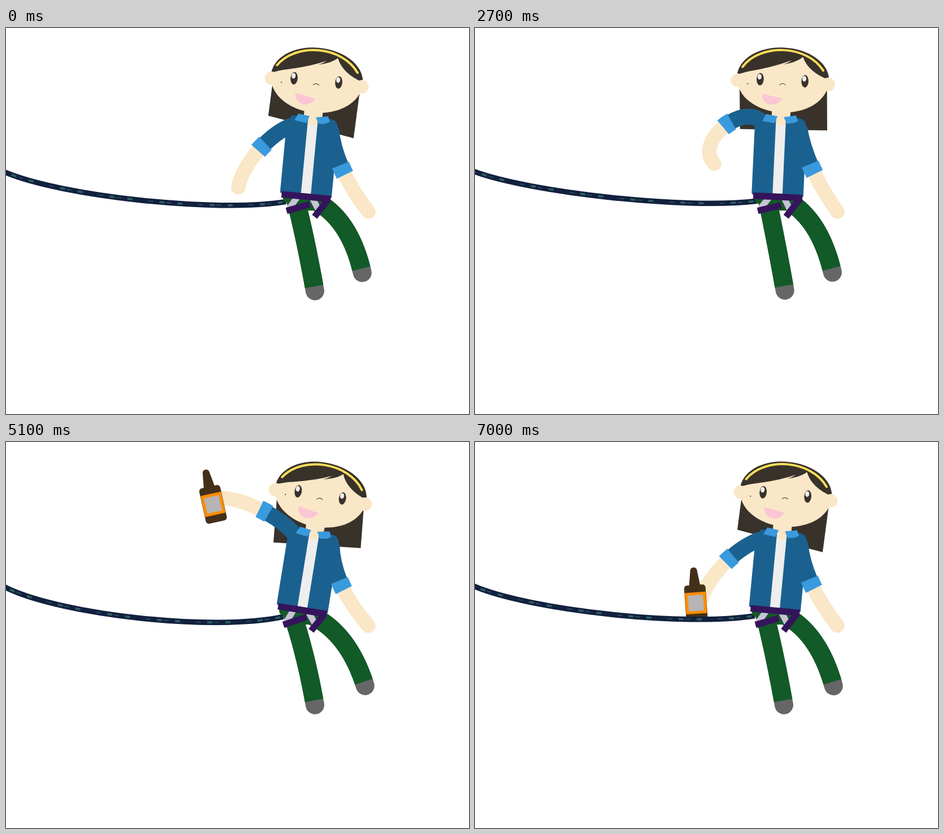
An HTML page for the animation above (7.1 s loop, 819 by 683 pixels).

```html
<!DOCTYPE html>
<html lang="en">
<head>
<meta charset="utf-8">
<title>Swinging on a rope</title>
<style>
html, body { margin: 0; width: 100%; height: 100%; overflow: hidden; background: #fff; }
svg { display: block; width: 100%; height: 100%; }
.line { fill: none; }
.skin { fill: #fae7c7; }
.hair { fill: #38322a; }
.blue { fill: #1b618f; }
.cuff { fill: #3a9ade; }
.arm-skin { stroke: #fae7c7; stroke-width: 25.5; stroke-linecap: round; stroke-dasharray: 60 200; stroke-dashoffset: -50; }
.sleeve { stroke: #1b618f; stroke-width: 28; stroke-dasharray: 44 200; }
.band { stroke: #3a9ade; stroke-width: 32; stroke-dasharray: 11.6 200; stroke-dashoffset: -41; }
.foot { stroke: #666; stroke-width: 33; stroke-linecap: round; }
.leg { stroke: #125a27; stroke-width: 33; stroke-dasharray: 95.3 200; }
.rope { stroke: #12203f; stroke-width: 9.5; }
.fleck, .thread { stroke-dasharray: 9 23 9 47.8; }
.fleck { stroke: #2c625e; stroke-width: 3.6; stroke-dashoffset: -5.5; }
.thread { stroke: #24505a; stroke-width: 1.8; stroke-dashoffset: -25.5; }
.loop { stroke: #35145c; stroke-width: 11.5; }
.strap { stroke: #c9c3d6; stroke-width: 11; }
</style>
</head>
<body>
<svg viewBox="0 0 819 683" preserveAspectRatio="none">
  <g class="sway"><path id="backHair" class="hair"/></g>

  <g class="line" id="leftArm">
    <path class="arm-skin" pathLength="100"/>
    <path class="sleeve" pathLength="100"/>
    <path class="band" pathLength="100"/>
  </g>

  <g id="bottle">
    <g transform="translate(-12 9)">
      <path d="M-10-30L-6-58Q-5-63 0-63T6-58L10-30Z" fill="#44301a"/>
      <rect x="-19" y="-32" width="38" height="64" rx="5.5" fill="#44301a"/>
      <rect x="-18.5" y="-19" width="37" height="38" rx="1" fill="#ff8c00"/>
      <rect x="-13.5" y="-14" width="27" height="28" rx="1" fill="#b6b4b4"/>
    </g>
  </g>

  <g class="line" id="rope">
    <path class="rope"/>
    <path class="fleck"/>
    <path class="thread"/>
  </g>

  <g class="line" id="rightLeg">
    <path class="foot" pathLength="100"/>
    <path class="leg" pathLength="100"/>
  </g>
  <g class="line" id="leftLeg">
    <path class="foot" pathLength="100"/>
    <path class="leg" pathLength="100"/>
  </g>
  <path id="hips" fill="#125a27"/>
  <path id="straps" class="line strap"/>
  <path id="loops" class="line loop"/>

  <g class="sway">
    <path class="blue" d="M-38-40H28Q45-40 45.500-22V99H-43Q-46 99-46 95V-22Z"/>
    <rect x="-9" y="-30" width="17.500" height="127" fill="#eee"/>
    <rect class="skin" x="-17" y="-58" width="33" height="18"/>
    <rect class="skin" x="-9" y="-45" width="17.500" height="19" rx="5"/>
    <path class="cuff" d="M-27-44.500L-6.500-41.500-11.500-29-33-32Z"/>
    <path class="cuff" d="M4.500-40.500L26-44.500 30-35 23-31 10.500-29Z"/>
    <rect x="-43" y="95" width="87" height="11.500" fill="#35145c"/>

    <ellipse class="skin" cy="-106" rx="81" ry="57.500"/>
    <path class="hair" d="M-81.500-111C-79-140-46-163.500-1-163.500S80-140 81.500-110
      Q44-122 33.500-148.500Q23-138.500-1-133.500Q7-136 14-142Q-12-130-51-121Q-71-117-81.500-111Z"/>
    <path class="line" d="M-72.500-126C-42-170 40-170 70.500-126" stroke="#fbdd5a" stroke-width="4" stroke-linecap="round"/>
    <circle class="skin" cx="-80.300" cy="-102" r="12"/>
    <circle class="skin" cx="80.300" cy="-102" r="12"/>
    <g id="eye">
      <ellipse class="hair" cx="-40.300" cy="-105.700" rx="6.300" ry="11"/>
      <ellipse cx="-41.600" cy="-110" rx="3.600" ry="5" fill="#eee"/>
    </g>
    <use href="#eye" x="79.300"/>
    <circle class="hair" cx="-62" cy="-96.600" r="1"/>
    <path class="line" d="M-6-97Q-.5-102.500 5-97.500" stroke="#38322a"/>
    <path d="M-35.500-80L.5-73.500C-5-57-36-56-35.500-80Z" fill="#fbc6d4"/>
  </g>

  <g class="line" id="rightArm">
    <path class="arm-skin" pathLength="100"/>
    <path class="sleeve" pathLength="100"/>
    <path class="band" pathLength="100"/>
  </g>
</svg>
<script>
const LOOP = 7100, STEP = 100, PIVOT = [539.8, 198];
const GRAB = 3250, LIFT = 3700, RAISED = 5100, LOWERED = 6300;
const $ = id => document.getElementById(id);

// Time and place of the moving hand
const hand = [
  [0, 411, 282], [1900, 401, 253], [2700, 423, 240], [GRAB, 512, 258], [LIFT, 466, 256],
  [4400, 372, 192], [RAISED, 376, 99], [5575, 408, 56], [LOWERED, 359, 151], [LOOP, 404, 279]
];

const smooth = u => (1 - Math.cos(Math.PI * Math.min(1, Math.max(0, u)))) / 2;
const between = (t, from, to) => smooth((t - from) / (to - from));
const bump = (t, mid, half) => smooth(1 - Math.abs(t - mid) / half);

// Smooth curve through timed points
function spline(keys, t) {
  let i = 0;
  while (i < keys.length - 2 && t >= keys[i + 1][0]) i++;
  const a = keys[i], b = keys[i + 1];
  const span = b[0] - a[0], u = (t - a[0]) / span;
  const slope = (k, c) => {
    const p = keys[k - 1], n = keys[k + 1];
    return p && n ? (n[c] - p[c]) / (n[0] - p[0]) * span : 0;
  };
  return [1, 2].map(c => {
    const v = a[c], w = b[c], m = slope(i, c), n = slope(i + 1, c);
    return v + u * (m + u * (3 * (w - v) - 2 * m - n + u * (2 * (v - w) + m + n)));
  });
}

// The nearer the hand comes to the shoulder, the more the elbow bows out
function armPath([sx, sy], [hx, hy]) {
  const d = Math.hypot(hx - sx, hy - sy), ux = (hx - sx) / d, uy = (hy - sy) / d;
  const fold = 153 - d, along = 38 - fold * 1.05, out = 22 + fold * 0.8;
  const c1 = [sx + ux * along - uy * out, sy + uy * along + ux * out];
  const c2 = [hx - ux * along - uy * out, hy - uy * along + ux * out];
  return `M${sx} ${sy}C${c1} ${c2} ${hx} ${hy}`;
}

const setPath = (group, d) => {
  for (const p of $(group).children) p.setAttribute('d', d);
};

function draw(t) {
  // Two swings per loop; the one in the middle goes further
  const back = (1 + Math.cos(4 * Math.PI * t / LOOP)) / 2;
  const far = Math.abs(t - LOOP / 2) < LOOP / 4;
  const a = 9.7 - (far ? 13.2 : 4.3) * back;
  const rad = a * Math.PI / 180, cos = Math.cos(rad), sin = Math.sin(rad);
  const at = (x, y) => [PIVOT[0] + x * cos - y * sin, PIVOT[1] + x * sin + y * cos];

  for (const g of document.querySelectorAll('.sway'))
    g.setAttribute('transform', `translate(${PIVOT}) rotate(${a})`);

  const h = (far ? 7.5 : 15.2) * back - 5.8, hx = 4 - 0.7 * h, hy = -19 - 0.4 * h;
  const drop = 77 * Math.tan(h * Math.PI / 180);
  $('backHair').setAttribute('d',
    `M-77-105H78L${hx + 77} ${hy + drop}L${hx - 77} ${hy - drop}Z`);

  const grip = spline(hand, t);
  const turn = -180 + 167.5 * between(t, LIFT, RAISED) + 8.5 * between(t, RAISED, LOWERED);
  setPath('leftArm', armPath(at(-29.5, -25), grip));
  $('bottle').setAttribute('transform', `translate(${grip}) rotate(${turn})`);
  $('bottle').style.display = t < GRAB ? 'none' : '';
  setPath('rightArm', `M${at(33, -23)}Q${588.5 - 1.15 * a} ${244 + 0.95 * a} 641 325`);

  // Drawn from the harness outward so the flecks stay fixed to that end
  setPath('rope', `M${501.5 - 1.2 * a} ${305 + 0.45 * a}C370 ${315.5 + 2.2 * a} ` +
    `100 ${284.5 + 2.4 * a} 0 ${253.2 + 0.5 * a}L-20 ${244 + 0.2 * a}`);

  // The left leg kicks twice, then rests
  const kick = t < 4800 ? 7.5 * Math.sin(Math.PI * t / 2400) ** 2 : 0;
  const lx = 546.5 + kick * 1.5, ly = 465.3 - kick;
  setPath('leftLeg', `M${at(-18, 106)}Q${lx - 16.5} ${ly - 93} ${lx} ${ly}`);
  const stretch = 11.5 * (bump(t, 1500, 1800) + bump(t, 6000, 1800));
  const rx = 629.5 + stretch, ry = 433.3 - 0.33 * stretch;
  setPath('rightLeg', `M${at(20, 108)}Q${612 - 0.6 * a} 340 ${rx} ${ry}`);

  const ox = 504 - 1.45 * a, iy = 315.5 - 0.65 * a;
  const knot = [554.5 - 1.6 * a, 334];
  $('hips').setAttribute('d',
    `M${at(-42, 102)}L${at(-38, 113)}L${ox + 20} 320L${ox + 28} 323H${ox + 54}L${at(42, 104)}Z`);
  $('straps').setAttribute('d',
    `M${at(-15, 103)}L${ox + 5} 319M${at(13, 104)}L${knot[0] + 7} 322`);
  $('loops').setAttribute('d',
    `M${ox} 323.5L${ox + 41} ${iy}M${at(40, 102)}L${knot}`);
}

const start = performance.now();
function tick() {
  const t = (performance.now() - start) % LOOP;
  draw(Math.floor(t / STEP) * STEP);
  requestAnimationFrame(tick);
}
draw(0);
requestAnimationFrame(tick);
</script>
</body>
</html>
```
